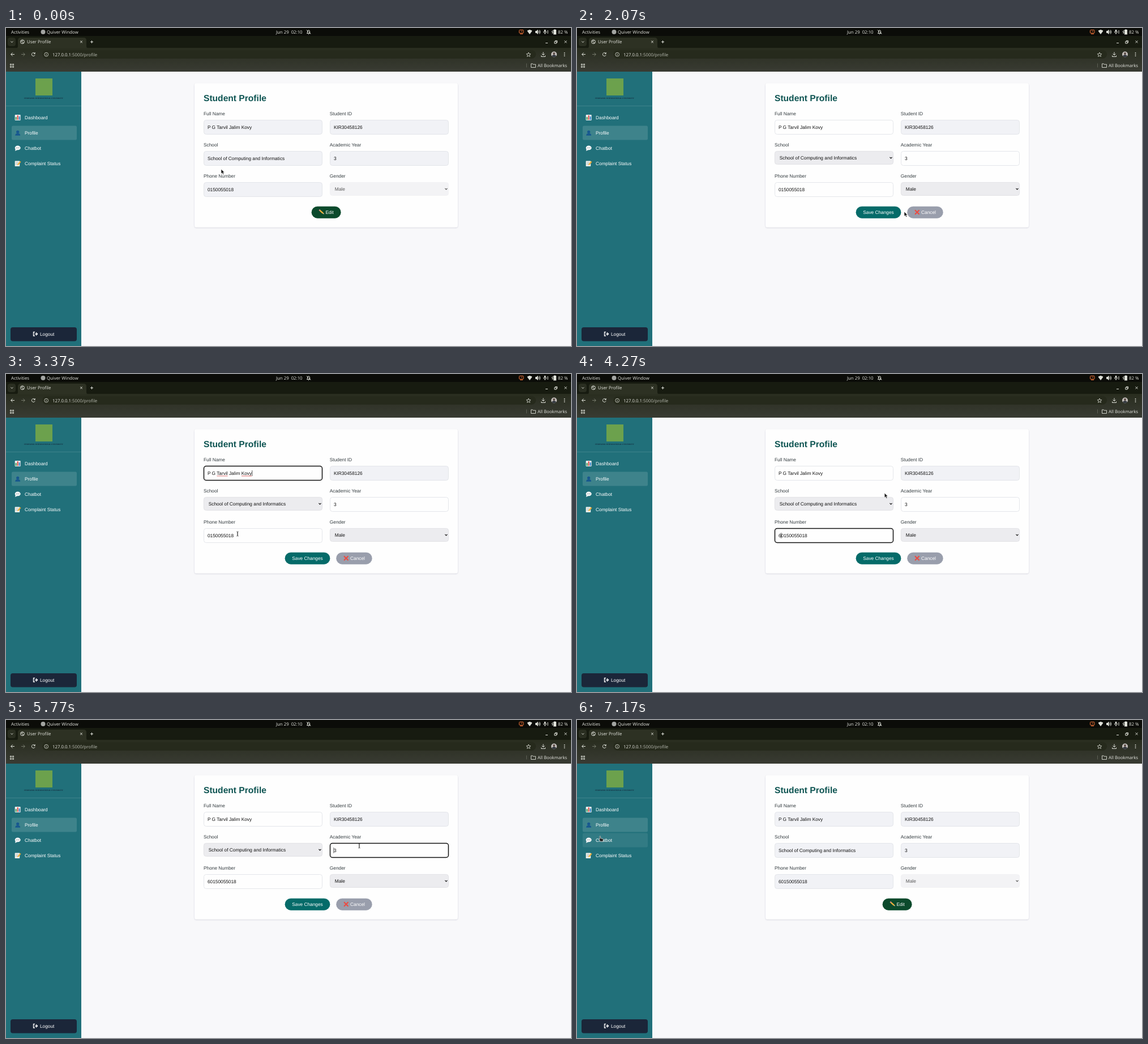
An HTML page for the animation above (7.2 s loop, 998 by 561 pixels).

```html
<!DOCTYPE html>
<html lang="en">
<head>
<meta charset="utf-8">
<title>User Profile</title>
<style>
  html, body { margin: 0; width: 100%; height: 100%; overflow: hidden; background: #f8f8fa; }
  svg { display: block; width: 998px; height: 561px; }
  text { font: 8.32px "Liberation Sans", Arial, sans-serif; text-rendering: geometricPrecision; white-space: pre; }
  .ui text { font: 7.8px "Open Sans", "Noto Sans", sans-serif; fill: #e6e7e1; }
  .line { fill: none; stroke: #dfe1d9; stroke-width: 1; }
</style>
</head>
<body>
<svg viewBox="0 0 998 561">
  <defs>
    <filter id="shadow" x="-5%" y="-5%" width="110%" height="112%">
      <feDropShadow dx="0" dy="1" stdDeviation="1.3" flood-color="#334" flood-opacity=".17"/>
    </filter>
    <linearGradient id="bar" x2="0" y2="1">
      <stop offset="0" stop-color="#292d1f"/><stop offset="1" stop-color="#393b33"/>
    </linearGradient>
  </defs>

  <!-- desktop bar and browser frame -->
  <g class="ui">
    <rect width="998" height="15" fill="#0b0c08"/>
    <rect y="14" width="998" height="23" fill="#171b10"/>
    <rect y="35" width="998" height="42" fill="url(#bar)"/>
    <path d="M17 36q4 0 4-4v-10q0-5 5-5h111q5 0 5 5v10q0 4 4 4z" fill="#2d3123"/>
    <rect x="3" y="17" width="14" height="15" rx="4" fill="#2a2e21"/>
    <rect x="64" y="39" width="872" height="15" rx="7.5" fill="#262a1c"/>
    <text x="9" y="10">Activities</text>
    <circle cx="65.5" cy="7" r="4" fill="#a3a5a2"/>
    <text x="72" y="10">Quiver Window</text>
    <text x="477" y="10">Jun 29  02:10</text>
    <text x="975" y="10">82 %</text>
    <text x="37" y="27">User Profile</text>
    <text x="82" y="49.5">127.0.0.1<tspan fill="#b9bbb2">:5000/profile</tspan></text>
    <text x="939" y="68.7">All Bookmarks</text>
    <g class="line">
      <path d="M531.5 9.5h6l-1-1.5v-2a2 2 0 0 0-4 0v2zM534 11h1M531 3.5l7 7"/>
      <rect x="906.5" y="3.5" width="7.5" height="5.5" rx="1" stroke="#ed7136"/>
      <path d="M910 6h2M908 10.5h5" stroke="#ed7136"/>
      <path d="M921 5q4-3 8 0l-4 5.5z" fill="#dfe1d9"/>
      <path d="M935.5 5.5h1.7l2-2v7l-2-2h-1.7z" fill="#dfe1d9"/>
      <path d="M941 5q1.5 2 0 4M942.5 3.5q2.5 3.5 0 7"/>
      <path d="M952 3v4" stroke-width="2.5"/>
      <path d="M949.5 6q0 3 2.5 3t2.5-3M952 9v2M957 4v6"/>
      <rect x="967.5" y="3.5" width="4" height="7.5" fill="#dfe1d9"/>
      <path d="M969 2.5h1M966 4l-2 3h2l-1 3"/>
      <path d="M8.4 23.5l2 2 2-2M131.2 22.6l3.6 3.6m0-3.6l-3.6 3.6M149 24.5h5m-2.5-2.5v5"/>
      <circle cx="29" cy="24.3" r="3.4"/><path d="M26 23q3 0 3 2t3 1M28 21l2 2"/>
      <path d="M953 26.5h4M968.8 23.8h3.4v3.4h-3.4zM970.2 23.8v-1.4h3.4v3.4h-1.4M986.5 22.4l4 4m0-4l-4 4"/>
      <path d="M15 46.5h-6.3m3-3l-3 3 3 3"/>
      <path d="M27 46.5h6.3m-3-3l3 3-3 3" stroke="#777b6d"/>
      <path d="M51 45a3 3 0 1 0 .2 2.6M51.2 43v2.4h-2.4"/>
      <circle cx="71.2" cy="46.7" r="3.4" stroke-width=".8"/><path d="M71.2 46v2.5M71.2 44.5v.7" stroke-width=".8"/>
      <path d="M923 43l1 2.6 2.8.2-2.1 1.8.7 2.8-2.4-1.5-2.4 1.5.7-2.8-2.1-1.8 2.8-.2z" stroke-width=".8"/>
      <path d="M949 42.5v5.5m-2.5-2.5l2.5 2.5 2.5-2.5M945.5 48.5v2h7v-2"/>
      <path d="M7.5 63.5h2v2h-2zM11.5 63.5h2v2h-2zM7.5 67.5h2v2h-2zM11.5 67.5h2v2h-2z" stroke-width=".9"/>
      <path d="M919.5 62.5v7" stroke="#5d6055"/>
      <path d="M927.5 63h2.6l1 1.2h4.4v5.3h-8z" stroke-width=".9"/>
    </g>
    <circle cx="968" cy="46.5" r="5" fill="#c6c1be"/>
    <path d="M964 49.5q1-2.5 4-2.5t4 2.5a5 5 0 0 1-8 0z" fill="#353a40"/>
    <circle cx="968" cy="45" r="2" fill="#594a43"/>
    <path d="M986.5 43v1.5m0 1.3v1.5m0 1.3v1.5" stroke="#dfe1d9" stroke-width="1.5"/>
  </g>

  <!-- sidebar -->
  <rect y="77" width="133" height="484" fill="#21707a"/>
  <rect x="52" y="89" width="30" height="30" fill="#6ca14d"/>
  <text x="66.5" y="125.2" text-anchor="middle" style="font:bold 3.3px 'Liberation Serif',Times,serif" fill="#14293c">FERNWICK INTERNATIONAL UNIVERSITY</text>
  <path d="M0 137.5h133" stroke="#fff" stroke-opacity=".13"/>
  <g id="nav"></g>
  <rect x="8" y="528" width="117" height="24.5" rx="4" fill="#1b2639"/>
  <path d="M51 536.5h-2.5v6.5H51M50.5 539.8h4.5m-2-2.5l2.5 2.5-2.5 2.5" fill="none" stroke="#fff" stroke-width="1.3"/>
  <text x="60" y="542.8" fill="#fff">Logout</text>

  <!-- form -->
  <rect x="333" y="97.5" width="465" height="254" rx="3.5" fill="#fefefe" filter="url(#shadow)"/>
  <text x="349" y="129" style="font-size:15.6px;font-weight:bold" fill="#0e5452">Student Profile</text>
  <g id="form"></g>
  <g id="cursor"></g>
</svg>

<script>
const LOOP = 7200, EM = 8.32;
const EDIT = 1880, SAVE = 6110, TYPED = 4050;
const FOCUS = [
  { from: 2900, to: 3500, field: "name" },
  { from: 3500, to: 4500, field: "phone" },
  { from: 4500, to: 5300, field: "id" },
  { from: 5300, to: SAVE, field: "year" }
];
// pointer path: time, x, y
const PATH = [
  [30, 380, 249], [600, 559, 325], [1850, 559, 325], [2070, 578, 324],
  [2470, 578, 324], [2800, 466, 177], [3270, 450, 181], [3370, 409, 282],
  [3480, 356, 284], [4060, 356, 284], [4400, 634, 174], [4500, 634, 174],
  [4720, 571, 170], [5000, 571, 170], [5240, 576, 228], [5480, 576, 228],
  [5770, 624, 222], [5810, 624, 222], [6060, 527, 326], [6920, 527, 326],
  [7170, 40, 205]
];
const NAME = "P G Tarvil Jalim Kovy", ID = "KIR30458126", PHONE = "0150055018";
const $ = id => document.getElementById(id);

const rect = (x, y, w, h, r, fill, extra = "") =>
  `<rect x="${x}" y="${y}" width="${w}" height="${h}" rx="${r}" fill="${fill}" ${extra}/>`;
const text = (x, y, s, fill = "#111", extra = "") =>
  `<text x="${x}" y="${y}" fill="${fill}" ${extra}>${s}</text>`;
const inside = (p, x, y, w, h) => p.x >= x && p.x <= x + w && p.y >= y && p.y <= y + h;

const pen = document.createElement("canvas").getContext("2d");
const width = s => {
  pen.font = "100px 'Liberation Sans', Arial, sans-serif";
  return pen.measureText(s).width * EM / 100;
};

function pointer(t) {
  const i = PATH.findIndex(k => k[0] > t);
  if (i <= 0) {
    const k = PATH[i < 0 ? PATH.length - 1 : 0];
    return { x: k[1], y: k[2] };
  }
  const [t0, x0, y0] = PATH[i - 1], [t1, x1, y1] = PATH[i];
  const u = (t - t0) / (t1 - t0), e = u * u * (3 - 2 * u);
  return { x: x0 + (x1 - x0) * e, y: y0 + (y1 - y0) * e };
}

const ICONS = [
  rect(-5, -5, 10, 10, 1, "#eef1f3") +
    '<path d="M-3 4v-5" stroke="#3f9c55" stroke-width="2"/><path d="M0 4v-8" stroke="#d94b43" stroke-width="2"/><path d="M3 4v-6" stroke="#337fc4" stroke-width="2"/>',
  '<g fill="#17588f"><circle cy="-1.7" r="2.6"/><path d="M-4.5 4.7q0-4 4.5-4t4.5 4z"/></g>',
  '<ellipse cy="-.6" rx="5" ry="3.9" fill="#f4f6f7"/><path d="M-4 1l-.5 4 4-2z" fill="#f4f6f7"/><path d="M-2.7-.5h1m1.2 0h1m1.2 0h1" stroke="#536167" stroke-width="1.1"/>',
  rect(-5, -4.5, 8.5, 9.5, .6, "#f2f3ee") +
    '<path d="M-3.5-2h5m-5 2h4m-4 2h3" stroke="#9ba9b2" stroke-width=".7"/><path d="M5-3.5l-5 6" stroke="#f0ac35" stroke-width="2"/>'
];
const ITEMS = ["Dashboard", "Profile", "Chatbot", "Complaint Status"];

function drawNav(p) {
  return ITEMS.map((label, i) => {
    const y = 158 + 27 * i, box = [10, y - 12.5, 115, 25];
    const glow = i === 1 ? .13 : inside(p, ...box) ? .08 : 0;
    return rect(...box, 2.5, "#fff", `fill-opacity="${glow}"`) +
      `<g transform="translate(20.7 ${y})">${ICONS[i]}</g>` + text(33, y + 3, label, "#fff");
  }).join("");
}

const caret = (x, y) => rect(x, y - 5, .7, 10, 0, "#111");

function squiggle(x, w, y) {
  let d = `M${x} ${y}`;
  for (let i = 1; i <= w; i++) d += `L${x + i} ${y + (i % 2 ? 1.2 : 0)}`;
  return `<path d="${d}" fill="none" stroke="#d63c3c" stroke-width=".7"/>`;
}

function input(x, y, value, enabled, focused) {
  const border = focused ? 'stroke="#111" stroke-width="1.5"' : 'stroke="#dfe1e6" stroke-width=".8"';
  return rect(x + .5, y + .5, 209, 25, 4, enabled ? "#fefefe" : "#f1f2f6", border) +
    text(x + 6.9, y + 15.8, value);
}

function select(x, y, value, enabled) {
  const ink = enabled ? "#111" : "#555";
  return rect(x + .4, y + .4, 209.2, 23, 4, enabled ? "#ececef" : "#f3f3f5",
      `stroke="${enabled ? "#dcdce0" : "#f0f0f3"}" stroke-width=".7"`) +
    text(x + 8.8, y + 14.8, value, ink) +
    `<path d="M${x + 203.5} ${y + 10.8}l2 2 2-2" fill="none" stroke="${ink}" stroke-width="1.2"/>`;
}

const button = (x, w, fill) => rect(x, 314.7, w, 21, 10.5, fill);
const labels = [["Full Name", "Student ID"], ["School", "Academic Year"], ["Phone Number", "Gender"]]
  .map((row, i) => row.map((s, j) => text(349 + 222.8 * j, 154.4 + 55 * i, s, "#333b3f")).join("")).join("");

function drawForm(t, p, editing) {
  const focus = FOCUS.find(f => t >= f.from && t < f.to) || {};
  const on = field => focus.field === field;
  const phone = (t >= TYPED ? "6" : "") + PHONE;
  const L = 349, R = 572, school = "School of Computing and Informatics";
  let s = labels +
    input(L, 162, NAME, editing, on("name")) + input(R, 162, ID, false, on("id")) +
    (editing ? select : input)(L, 217, school, editing) + input(R, 217, "3", editing, on("year")) +
    input(L, 272, phone, editing, on("phone")) + select(R, 272, "Male", editing);

  const start = on("phone") && t >= TYPED ? TYPED : focus.from;
  const lit = (t - start) % 1000 < 500;
  if (on("name")) {
    const words = NAME.split(" ");
    for (const w of [words[2], words[4]])
      s += squiggle(355.9 + width(NAME.slice(0, NAME.indexOf(w))), width(w), 179.3);
    if (lit) s += caret(355.9 + width(NAME), 175);
  }
  if (on("phone") && lit) s += caret(355.7 + (t >= TYPED ? width("6") : 0), 285);
  if (on("year") && lit) s += caret(578.6, 230);
  if (on("id")) {
    const end = 578.9 + width(ID);
    const from = t > 4720 ? 578.7 : Math.min(end, Math.max(578.7, p.x));
    s += `<clipPath id="sel">${rect(from, 168.7, end - from, 12.4, 0, "#000")}</clipPath>` +
      `<g clip-path="url(#sel)">${rect(570, 160, 70, 30, 0, "#2865c9")}${text(578.9, 177.8, ID, "#fff")}</g>`;
  }

  if (editing) {
    s += button(492.6, 79.8, "#056b69") + text(532.5, 327.8, "Save Changes", "#fff", 'text-anchor="middle"') +
      button(583.2, 63.5, "#999eac") + text(608, 327.8, "Cancel", "#fff") +
      '<path d="M597 321.3l7.5 7.5m0-7.5l-7.5 7.5" stroke="#ee4a40" stroke-width="2"/>';
  } else {
    s += button(539.6, 52, "#0b4a2c") + text(564.4, 327.8, "Edit", "#fff") +
      '<path d="M554.5 321.8l5.5 5" stroke="#f2b13a" stroke-width="2.4"/>' +
      '<path d="M553.3 320.7l1.3 1.2" stroke="#e88a91" stroke-width="2.4"/>' +
      '<path d="M559.6 327.7l1.6-1.8.7 2.7z" fill="#e9cfaa"/>';
  }
  return s;
}

const SHAPES = {
  arrow: '<path d="M0 0v8.2l1.9-1.7 1.4 3 1.5-.7-1.4-2.9h2.6z" fill="#151515" stroke="#fff" stroke-width=".6"/>',
  beam: '<path d="M-1.7-4q1.7 0 1.7 1v6q0 1-1.7 1M1.7-4q-1.7 0-1.7 1v6q0 1 1.7 1" fill="none" stroke="#333" stroke-width=".8"/>',
  hand: '<path d="M0 .7q0-1 .8-1t.8 1v3l4 .8q.9.2.8 1.2l-.6 3.6h-4.5l-2.6-3.5q.2-1 1.3-.3z" fill="#222" stroke="#fff" stroke-width=".6"/>'
};

function cursorKind(t, p, editing) {
  if (t >= 4500 && t < 5000) return "beam";
  const buttons = editing ? [[492, 80], [583, 64]] : [[539, 53]];
  if (buttons.some(([x, w]) => inside(p, x, 314, w, 22)) || inside(p, 10, 145, 115, 108)) return "hand";
  const fields = [[349, 162], [572, 162], [572, 217], [349, 272]];
  return editing && fields.some(([x, y]) => inside(p, x, y, 210, 26)) ? "beam" : "arrow";
}

function frame(now) {
  const t = now % LOOP, p = pointer(t), editing = t >= EDIT && t < SAVE;
  $("nav").innerHTML = drawNav(p);
  $("form").innerHTML = drawForm(t, p, editing);
  $("cursor").innerHTML = `<g transform="translate(${p.x} ${p.y})">${SHAPES[cursorKind(t, p, editing)]}</g>`;
  requestAnimationFrame(tick);
}

let began;
function tick(now) {
  began ??= now;
  frame(now - began);
}
frame(0);
</script>
</body>
</html>
```
